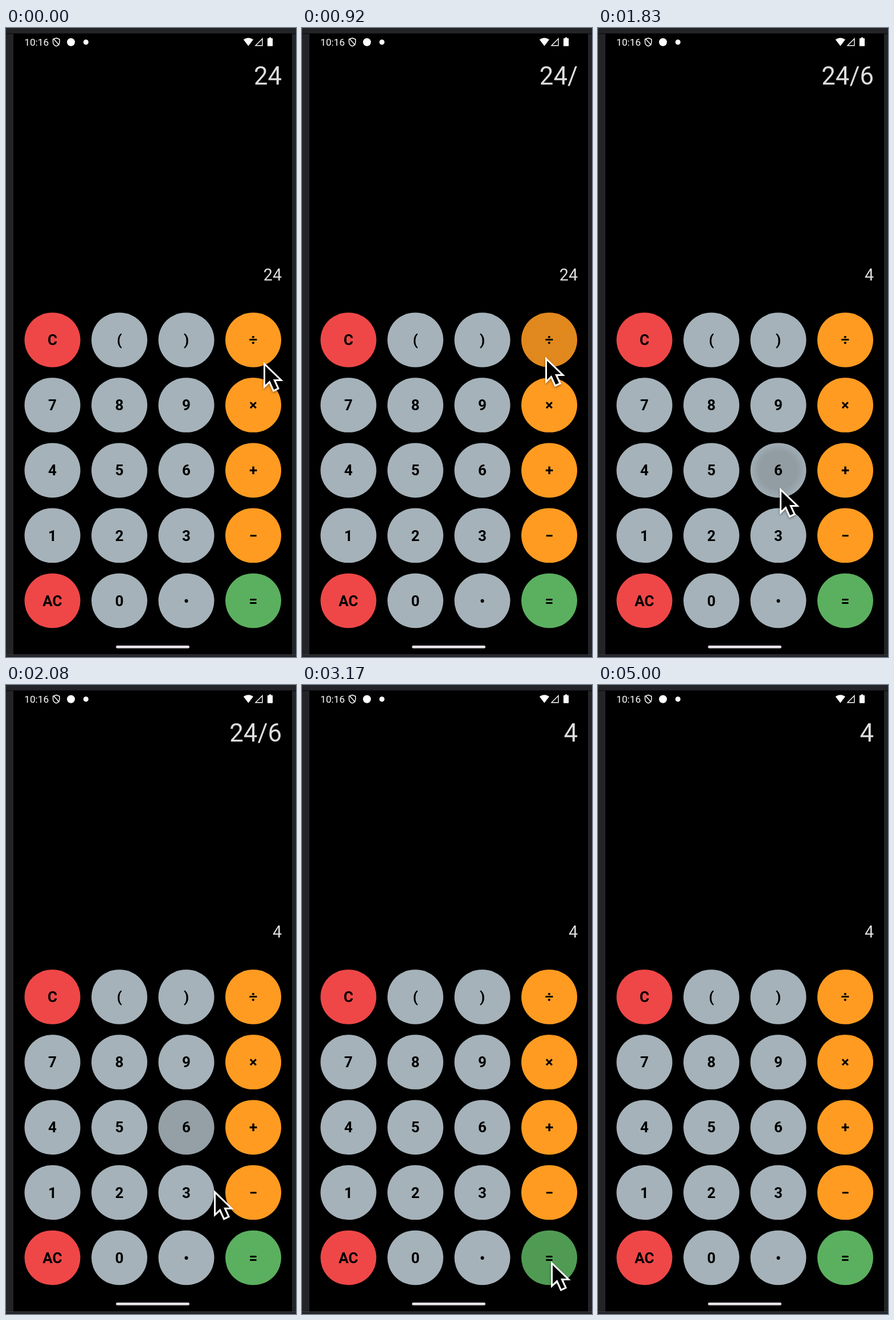
Recreate the animation shown at these times as an HTML page. Size 509 by 1101 pixels, loop 5080 ms.

```html
<!DOCTYPE html>
<html lang="en">
<head>
<meta charset="utf-8">
<title>Calculator</title>
<style>
  html, body { margin: 0; width: 100%; height: 100%; overflow: hidden; background: #232428; }
  svg { display: block; font-family: Roboto, sans-serif; }
  .key { font-size: 26px; font-weight: 700; text-anchor: middle; }
  .out { fill: #dedede; text-anchor: end; }
</style>
</head>
<body>
<svg width="509" height="1101" viewBox="0 0 509 1101">
  <defs>
    <radialGradient id="ripple" gradientUnits="userSpaceOnUse" r="50">
      <stop offset=".62" stop-color="#000" stop-opacity=".12"/>
      <stop offset="1" stop-color="#000" stop-opacity="0"/>
    </radialGradient>
    <filter id="shadow" x="-30%" y="-30%" width="160%" height="170%">
      <feDropShadow dx="0" dy="2" stdDeviation="2" flood-color="#000" flood-opacity=".4"/>
    </filter>
  </defs>

  <rect width="509" height="1101" fill="#232428"/>
  <rect y="9" width="509" height="1.5" fill="#111214"/>
  <rect x="13" y="10" width="489" height="1087" fill="#000"/>
  <rect y="1096.5" width="509" height="1.2" fill="#3b3c40"/>

  <g fill="#fff">
    <text x="32.3" y="30.8" font-size="17.2">10:16</text>
    <path d="M88.2 17.5l5.7 2.2v4.6c0 3.6-2.4 6.5-5.7 7.6c-3.3-1.1-5.7-4-5.7-7.6v-4.6zM83 18.5l10.5 11.5" fill="none" stroke="#fff" stroke-width="1.5"/>
    <circle cx="114" cy="24.8" r="7"/>
    <circle cx="140.3" cy="24.8" r="4.5"/>
    <path d="M416.8 20.3q8.6-6.2 17.2 0l-8.6 11.2z"/>
    <path d="M450 18.8v12h-12z" fill="none" stroke="#fff" stroke-width="1.4"/>
    <path d="M461.5 18v-1.6h4v1.6h1.6q1 0 1 1v11.8q0 1-1 1h-7.2q-1 0-1-1v-11.8q0-1 1-1z"/>
  </g>

  <text id="expression" class="out" x="484" y="98.6" font-size="43.7"></text>
  <text id="preview" class="out" x="484" y="441.7" font-size="28.6"></text>
  <g id="keys"></g>
  <rect id="press" width="98" height="95.5" rx="47.75" fill="url(#ripple)"/>
  <g id="labels"></g>
  <rect x="193" y="1081" width="129" height="4.8" rx="2.4" fill="#e6e1e6"/>

  <path id="cursor" d="M1.5 4V44L10.5 35.5L17.5 51L26 47L19.3 32.5H31Z" stroke="#fff" stroke-width="3" filter="url(#shadow)"/>
</svg>
<script>
const LOOP = 5080, FPS = 12;
const RED = '#ef4747', GRAY = '#a5b2b9', ORANGE = '#ff9b21', GREEN = '#5bb05f';
const ROWS = ['C ( ) ÷', '7 8 9 ×', '4 5 6 +', '1 2 3 −', 'AC 0 • ='].map(row => row.split(' '));

// time, tip x, tip y
const PATH = [
  [80, 452, 584], [420, 427, 575], [1080, 427, 575], [1500, 319, 804],
  [1900, 319, 804], [2330, 437, 1008], [3330, 437, 1008], [3420, 452, 985]
];
const CURSOR_END = 3490;
const TAPS = [
  { at: 580, col: 3, row: 0 },
  { at: 1580, col: 2, row: 2 },
  { at: 2750, col: 3, row: 4 }
];
// time, expression, preview
const OUTPUT = [[0, '24', '24'], [660, '24/', '24'], [1660, '24/6', '4'], [2830, '4', '4']];

const $ = id => document.getElementById(id);
const keyX = col => 81.5 + 117.5 * col;
const keyY = row => 546 + 114.1 * row;
const clamp = v => Math.min(1, Math.max(0, v));

function add(parent, tag, attrs, text = '') {
  const node = document.createElementNS('http://www.w3.org/2000/svg', tag);
  for (const name in attrs) node.setAttribute(name, attrs[name]);
  node.textContent = text;
  parent.append(node);
}

function keyColor(label, col) {
  if (label === '=') return GREEN;
  if (label === 'C' || label === 'AC') return RED;
  return col === 3 ? ORANGE : GRAY;
}

ROWS.forEach((labels, row) => labels.forEach((label, col) => {
  const x = keyX(col), y = keyY(row);
  add($('keys'), 'rect', { x: x - 49, y: y - 47.75, width: 98, height: 95.5, rx: 47.75, fill: keyColor(label, col) });
  add($('labels'), 'text', { class: 'key', x, y: y + 9.2 }, label);
}));

function cursorAt(t) {
  const next = PATH.findIndex(point => point[0] > t);
  if (next === 0) return PATH[0].slice(1);
  if (next < 0) return PATH[PATH.length - 1].slice(1);
  const [t0, x0, y0] = PATH[next - 1], [t1, x1, y1] = PATH[next];
  const p = (t - t0) / (t1 - t0), e = p * p * (3 - 2 * p);
  return [x0 + (x1 - x0) * e, y0 + (y1 - y0) * e];
}

function drawRipple(t) {
  const tap = TAPS.find(({ at }) => t >= at && t < at + 825);
  $('press').setAttribute('visibility', tap ? 'visible' : 'hidden');
  if (!tap) return;
  const age = t - tap.at, x = keyX(tap.col), y = keyY(tap.row);
  const gradient = $('ripple');
  gradient.setAttribute('cx', x);
  gradient.setAttribute('cy', y);
  gradient.setAttribute('r', 15 + 95 * clamp(age / 450) ** 1.6);
  $('press').setAttribute('x', x - 49);
  $('press').setAttribute('y', y - 47.75);
  $('press').setAttribute('opacity', Math.min(clamp(age / 75), clamp((825 - age) / 375)));
}

function draw(t) {
  const [, expression, preview] = OUTPUT.filter(([at]) => at <= t).pop();
  $('expression').textContent = expression;
  $('preview').textContent = preview;
  drawRipple(t);
  $('cursor').setAttribute('transform', `translate(${cursorAt(t)})`);
  $('cursor').setAttribute('visibility', t < CURSOR_END ? 'visible' : 'hidden');
}

function tick(now) {
  const step = Math.floor((now % LOOP + 4) * FPS / 1000);
  draw(step * 1000 / FPS);
  requestAnimationFrame(tick);
}
draw(0);
requestAnimationFrame(tick);
</script>
</body>
</html>
```
